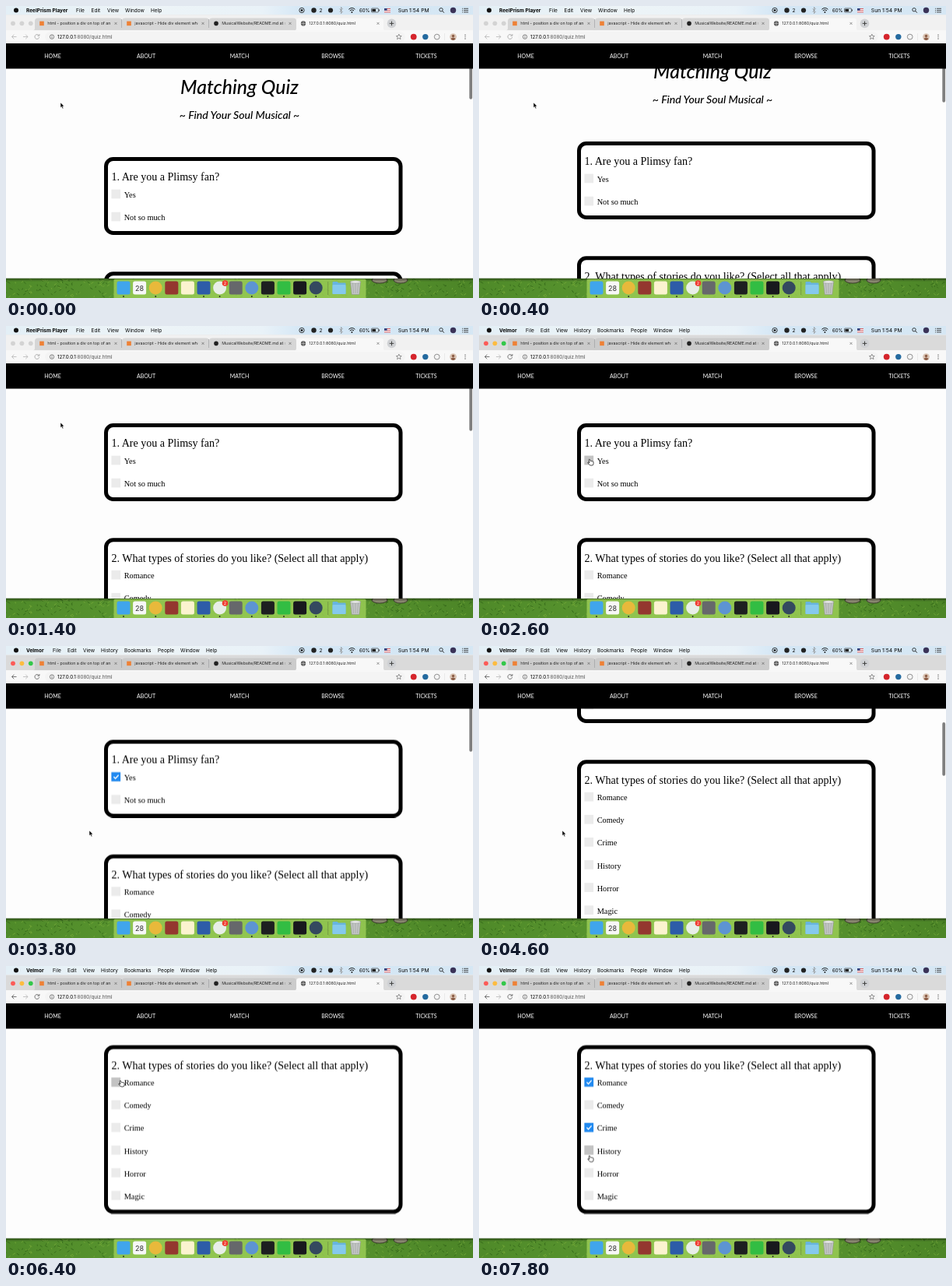
Recreate the animation shown at these times as an HTML page. Size 600 px wide and 375 px high, loop 8 s.

```html
<!DOCTYPE html>
<html lang="en">
<head>
<meta charset="utf-8">
<title>Matching Quiz</title>
<style>
  html, body { margin: 0; width: 100%; height: 100%; overflow: hidden; background: #fff; }
  svg { display: block; }
  #stage { width: 600px; height: 375px; }
  .ui { font-family: Inter, Roboto, sans-serif; }
  .menu { font-size: 6.5px; }
  .url { font-size: 6.25px; }
  .tab { font-size: 5.3px; }
  .nav { font: 7px Lato, sans-serif; fill: #fff; text-anchor: middle; }
  .title { font: italic 500 24.8px Lato, cursive; text-anchor: middle; }
  .subtitle { font: italic 500 14.1px Lato, cursive; text-anchor: middle; }
  .question { font: 14.06px "Liberation Serif", serif; }
  .option { font: 10.31px "Liberation Serif", serif; }
  .timed, .scroll, .thumb, .pointer { animation: 8s step-end infinite; }
  .scroll { animation-name: scroll; }
  .thumb { animation-name: thumb; }
  .pointer { animation-name: pointer; }

  @keyframes scroll {
    0% { transform: translateY(0); }
    2.5% { transform: translateY(-4px); }
    5% { transform: translateY(-20px); }
    7.5% { transform: translateY(-38px); }
    10% { transform: translateY(-52px); }
    12.5% { transform: translateY(-61px); }
    15% { transform: translateY(-66px); }
    17.5% { transform: translateY(-69px); }
    47.5% { transform: translateY(-73.5px); animation-timing-function: steps(4); }
    57.5% { transform: translateY(-195px); }
    60% { transform: translateY(-215px); }
    62.5% { transform: translateY(-229px); }
    65% { transform: translateY(-237px); }
    67.5%, 100% { transform: translateY(-239.5px); }
  }
  @keyframes thumb {
    0% { transform: translateY(0); }
    5% { transform: translateY(4px); animation-timing-function: steps(5); }
    17.5% { transform: translateY(15px); }
    47.5% { transform: translateY(16px); animation-timing-function: steps(4); }
    57.5% { transform: translateY(47px); animation-timing-function: steps(4); }
    67.5%, 100% { transform: translateY(57px); }
  }
  @keyframes pointer {
    0% { transform: translate(70px, 124px); }
    22.5% { transform: translate(70px, 124px); animation-timing-function: steps(3); }
    30% { transform: translate(142px, 171px); }
    37.5% { transform: translate(142px, 171px); animation-timing-function: steps(2); }
    42.5% { transform: translate(107px, 237px); }
    67.5% { transform: translate(107px, 237px); animation-timing-function: steps(4); }
    77.5% { transform: translate(147px, 147px); }
    85% { transform: translate(147px, 147px); animation-timing-function: steps(2); }
    90% { transform: translate(142px, 207px); }
    97.5%, 100% { transform: translate(142px, 243.5px); }
  }
</style>
</head>
<body>
<svg id="stage" viewBox="0 0 600 375" xmlns="http://www.w3.org/2000/svg"></svg>
<script>
const LOOP = 8000, ACTIVATE = 2600;
const rules = new Set();

// Wraps markup so that it shows only from start to end (ms).
function during(start, end, markup) {
  const name = `show-${start}-${end}`;
  rules.add(`@keyframes ${name} { 0% { opacity: 0 } ${start / LOOP * 100}% { opacity: 1 } ${end / LOOP * 100}% { opacity: 0 } }`);
  return `<g class="timed" style="animation-name:${name}">${markup}</g>`;
}
const rect = (x, y, w, h, fill, r = 0) => `<rect x="${x}" y="${y}" width="${w}" height="${h}" rx="${r}" fill="${fill}"/>`;
const circle = (x, y, r, fill) => `<circle cx="${x}" cy="${y}" r="${r}" fill="${fill}"/>`;
const line = (d, color, width = .8) => `<path d="${d}" fill="none" stroke="${color}" stroke-width="${width}"/>`;
const text = (x, y, str, cls, extra = '') => `<text x="${x}" y="${y}" class="${cls}" ${extra}>${str}</text>`;

function wallpaper() {
  let seed = 7, blades = '';
  const random = () => (seed = seed * 16807 % 2147483647) / 2147483647;
  for (let i = 0; i < 420; i++) {
    const x = random() * 600, y = 351 + random() * 24;
    blades += line(`M${x.toFixed(1)} ${y.toFixed(1)}l${(random() * 8 - 4).toFixed(1)} -2`, random() < .55 ? '#35691a' : '#72a638', .9);
  }
  const rock = (x, rx) => `<ellipse cx="${x}" cy="352" rx="${rx}" ry="4" fill="#8c8a72" stroke="#3a3a2c" stroke-width="1"/>`;
  return rect(0, 349, 600, 26, 'url(#grass)') + blades + rock(480, 10) + rock(507, 9) + rect(0, 349, 600, 5, 'url(#shade)');
}

function questionBox(top, question, options) {
  const frame = `<rect x="128.5" y="${top + 2.5}" width="378.5" height="${36.8 + options.length * 29.1}" rx="9.3" fill="#fff" stroke="#000" stroke-width="5"/>`;
  const rows = options.map(({ label, hover = [], checked }, i) => {
    const y = top + 41.6 + i * 29.1;
    const tick = `M138.4 ${y + 5.9}l2.2 2.3 4-4.6`;
    return rect(135.4, y, 11.7, 11.7, '#ebebeb')
      + (hover.length ? during(...hover, rect(135.4, y, 11.7, 11.7, '#c3c3c3')) : '')
      + (checked ? during(checked, LOOP, rect(135.4, y, 11.7, 11.7, '#2089f0') + line(tick, '#fff', 1.4)) : '')
      + text(151.7, y + 10.4, label, 'option');
  });
  return frame + text(135.4, top + 30.4, question, 'question') + rows.join('');
}

function page() {
  const content = text(300, 112.5, 'Matching Quiz', 'title')
    + text(300, 144.5, '~ Find Your Soul Musical ~', 'subtitle')
    + questionBox(194, '1. Are you a Plimsy fan?', [
      { label: 'Yes', hover: [2400, 3200], checked: 2800 },
      { label: 'Not so much' }
    ])
    + questionBox(341.2, '2. What types of stories do you like? (Select all that apply)', [
      { label: 'Romance', hover: [6200, 7000], checked: 6600 },
      { label: 'Comedy', hover: [7000, 7200] },
      { label: 'Crime', hover: [7200, 7800], checked: 7400 },
      { label: 'History', hover: [7800, 8000] },
      { label: 'Horror' },
      { label: 'Magic' }
    ]);
  const thumb = `<g class="thumb">${rect(595.3, 51, 3.8, 68.7, 'rgba(0,0,0,.5)', 1.9)}</g>`;
  const links = ['HOME', 'ABOUT', 'MATCH', 'BROWSE', 'TICKETS'];
  return rect(0, 48, 600, 301.7, '#fdfdfd')
    + `<g clip-path="url(#viewport)"><g class="scroll">${content}</g></g>`
    + rect(0, 48, 600, 32.5, '#000')
    + links.map((label, i) => text(60 + i * 120, 67, label, 'nav')).join('')
    + during(0, 2200, thumb) + during(3800, 6000, thumb);
}

function menuBar() {
  const items = list => list.map(([x, label], i) => text(x, 7.9, label, 'ui menu', i ? '' : 'font-weight="700"')).join('');
  const player = [[26, 'ReelPrism Player'], [90, 'File'], [109.5, 'Edit'], [130, 'View'], [153, 'Window'], [186, 'Help']];
  const browser = [[26, 'Velmor'], [60, 'File'], [79, 'Edit'], [99, 'View'], [122, 'History'], [152, 'Bookmarks'],
    [195, 'People'], [224, 'Window'], [257, 'Help']];
  return rect(0, 0, 600, 11.5, 'url(#sky)') + circle(13, 5.4, 3, '#111')
    + during(0, ACTIVATE, items(player)) + during(ACTIVATE, LOOP, items(browser))
    + `<circle cx="380" cy="5.5" r="3.2" fill="none" stroke="#111" stroke-width=".8"/>` + rect(378.7, 4.2, 2.6, 2.6, '#111', .5)
    + circle(395.5, 5.5, 3.2, '#222') + text(402.5, 7.9, '2', 'ui menu')
    + circle(417, 5.5, 3.1, '#222')
    + line('M428.5 3.5l4 4-2 2v-8l2 2-4 4', '#888', .7)
    + line('M440.4 4.3q4-3.6 8 0M441.8 6q2.6-2.4 5.2 0', '#111', 1) + circle(444.4, 8, .9, '#111')
    + text(454, 7.9, '60%', 'ui menu', 'style="font-size:6px"')
    + `<rect x="469.5" y="3" width="9" height="5" rx="1" fill="none" stroke="#222" stroke-width=".6"/>`
    + rect(470.4, 3.9, 4.6, 3.2, '#222') + rect(479, 4.5, .8, 2, '#222')
    + rect(486, 3, 8, 5.4, '#fff') + line('M486 3.5h8M486 5.7h8M486 7.9h8', '#c8343c', .8) + rect(486, 3, 3.6, 2.8, '#35457f')
    + text(503.8, 7.9, 'Sun 1:54 PM', 'ui menu', 'style="font-size:6.8px"')
    + `<circle cx="559" cy="4.8" r="2.2" fill="none" stroke="#111" stroke-width=".8"/>` + line('M560.6 6.4l2.2 2.2', '#111', 1)
    + circle(574.5, 5.5, 3.7, '#3b3358')
    + line('M586 3.3h1M588 3.3h6M586 5.6h1M588 5.6h6M586 7.9h1M588 7.9h6', '#222', .8);
}

function browserBar() {
  const tabs = [
    [46, 'html - position a div on top of another', '#ee8136'],
    [158, 'javascript - Hide div element when', '#ee8136'],
    [270, 'MusicalWebsite/README.md at master', '#222'],
    [382, '127.0.0.1:8080/quiz.html', '#555']
  ];
  const lights = colors => colors.map((c, i) => circle(9 + i * 11.4, 22.3, 2.9, c)).join('');
  const cross = x => line(`M${x - 1.5} 20.9l3 3m0-3l-3 3`, '#555', .6);
  const tabShape = (x, fill) => `<path d="M${x} 31.5q3 0 3-3v-9q0-4 4-4h104q4 0 4 4v9q0 3 3 3z" fill="${fill}"/>`;
  const strip = (back, tab) => rect(0, 11.5, 600, 20, back) + [34, 146, 258].map(x => tabShape(x, tab)).join('');
  const tabMarkup = tabs.map(([x, label, color], i) => (i < 2 ? rect(x + 102, 17, .5, 11, '#8d8f92') : '')
    + (i === 3 ? circle(x, 22.4, 3.1, color) + line(`M${x - 3} 22.4h6M${x} 19.4v6`, '#eee', .5)
      : rect(x - 2.8, 19.6, 5.6, 5.6, color, i === 2 ? 2.8 : 0))
    + `<svg x="${x + 7.3}" y="14" width="81" height="16">${text(0, 10.4, label, 'ui tab', 'fill="#222"')}</svg>`
    + cross(x + (i === 3 ? 96 : 95))).join('');
  const arrows = (back, rest) => line('M13.5 39.5h-6m2.8-2.8l-2.8 2.8 2.8 2.8', back)
    + line('M22 39.5h6m-2.8-2.8l2.8 2.8-2.8 2.8', '#b5b5b5')
    + line('M42.2 37.8a2.9 2.9 0 1 0 .5 2.3M42.9 36v2.3h-2.4', rest);
  return strip('#dadada', '#cbcbcb') + during(0, ACTIVATE, strip('#f1f1f1', '#d6d6d6'))
    + tabShape(370, '#f8f8f8')
    + tabMarkup
    + circle(495.5, 22.4, 5.8, '#cfd1d4') + line('M492.7 22.4h5.6M495.5 19.6v5.6', '#333', .9)
    + rect(0, 31.2, 600, 16.8, '#f8f8f8') + rect(50, 33.2, 463, 13, '#f4f4f4', 6.5)
    + during(0, ACTIVATE, lights(['#d3d3d3', '#d3d3d3', '#d3d3d3']) + arrows('#b5b5b5', '#a0a0a0'))
    + during(ACTIVATE, LOOP, lights(['#fc5b57', '#fdbc40', '#34c84a']) + arrows('#555', '#555'))
    + `<circle cx="59" cy="39.6" r="2.7" fill="none" stroke="#555" stroke-width=".7"/>` + line('M59 39.2v1.9M59 37.8v.7', '#555', .7)
    + text(66, 42, '127.0.0.1<tspan fill="#555">:8080/quiz.html</tspan>', 'ui url')
    + '<path d="M504.8 36.2l1 2.2 2.4.2-1.8 1.6.6 2.4-2.2-1.3-2.2 1.3.6-2.4-1.8-1.6 2.4-.2z" fill="none" stroke="#555" stroke-width=".6"/>'
    + circle(523.7, 39.6, 3.9, '#d5252c') + circle(538.8, 39.6, 3.7, '#246a9f')
    + '<circle cx="553.7" cy="39.6" r="3.4" fill="#f4f4f4" stroke="#777" stroke-width=".8"/>'
    + rect(563.5, 35, .5, 9, '#ddd')
    + circle(574.5, 39.6, 4.4, '#d9c4b4') + circle(574.5, 38.5, 1.7, '#8b5c45') + '<path d="M571.3 42.6q3.2-4 6.4 0-3.2 2.6-6.4 0z" fill="#8b5c45"/>'
    + [37.2, 39.6, 42].map(y => circle(590, y, .7, '#555')).join('');
}

function dock() {
  const icons = [
    ['#40a5ec', 0, 1], ['#f7f7f7', 0, 0], ['#e8b93b', 1, 1], ['#94372f', 0, 0], ['#fbf3cf', 0, 0], ['#2d5ca8', 0, 1],
    ['#e8eee8', 1, 1], ['#66686b', 0, 0], ['#5d94d2', 1, 1], ['#1d1f20', 0, 1], ['#32bd43', 0, 1], ['#18181d', 0, 1], ['#34495f', 1, 1]
  ];
  const apps = icons.map(([color, round, running], i) => {
    const x = 151 + i * 20.6;
    return rect((x - 8.5).toFixed(1), 353.5, 17, 17, color, round ? 8.5 : 2.5) + (running ? circle(x.toFixed(1), 373, .9, '#222') : '');
  }).join('');
  const folder = '<path d="M419.5 355q0-1 1-1h5l1.5 1.5h8.5q1 0 1 1v12.5q0 1-1 1h-15q-1 0-1-1z" fill="#68b5e0"/>' + rect(419.5, 358, 17, 12, '#85c9ec', 1);
  const bin = '<path d="M442.5 354h13l-1.7 16.5h-9.6z" fill="#c3c6c5" stroke="#8f9492" stroke-width=".6"/>'
    + line('M445.5 356l1 13M449 356v13M452.5 356l-1 13', '#979c9a', .6) + '<ellipse cx="449" cy="354.4" rx="6.6" ry="1.6" fill="#ececec" stroke="#8f9492" stroke-width=".5"/>';
  return rect(138.5, 350.8, 324, 25, 'rgba(158,208,88,.8)', 1.5) + apps
    + text(171.6, 366, '28', 'ui', 'font-size="9" text-anchor="middle" fill="#333"')
    + circle(281.5, 356, 3.8, '#f0392f') + text(281.5, 358, '2', 'ui', 'font-size="5.4" text-anchor="middle" fill="#fff"')
    + rect(413.5, 354, .6, 17, '#64803f') + folder + bin;
}

function pointer() {
  const arrow = '<path d="M0 0v6.6l1.5-1.4 1.1 2.5 1.2-.5-1.1-2.4h2.1z" fill="#000" stroke="#fff" stroke-width=".5"/>';
  const hand = '<path d="M-.9 .6q.9-1.2 1.5 0l.8 2q.7-.6 1.2 0 .7-.5 1.2.2 1-.3 1.1.8l.2 2q-.3 1.6-1.2 2.4h-3.2q-1.4-1.4-2.8-3.2-.4-1.2.8-.8l1.2.8z" fill="#fff" stroke="#000" stroke-width=".7"/>';
  return `<g class="pointer">${during(0, 2400, arrow)}${during(2400, 3200, hand)}${during(3200, 6200, arrow)}${during(6200, LOOP, hand)}</g>`;
}

const defs = `<defs>
  <linearGradient id="sky"><stop stop-color="#e3eff6"/><stop offset=".3" stop-color="#edf4f7"/><stop offset=".55" stop-color="#e9f2f8"/><stop offset=".64" stop-color="#d3e6f5"/><stop offset="1" stop-color="#d6e7f4"/></linearGradient>
  <linearGradient id="grass"><stop stop-color="#4f8a29"/><stop offset=".5" stop-color="#5f9c33"/><stop offset="1" stop-color="#4c8527"/></linearGradient>
  <linearGradient id="shade" x2="0" y2="1"><stop stop-color="#000" stop-opacity=".5"/><stop offset="1" stop-color="#000" stop-opacity="0"/></linearGradient>
  <clipPath id="viewport"><rect y="48" width="600" height="301.7"/></clipPath>
</defs>`;

const markup = defs + wallpaper() + page() + menuBar() + browserBar() + dock() + pointer();
const style = document.createElement('style');
style.textContent = [...rules].join('\n');
document.head.append(style);
document.getElementById('stage').innerHTML = markup;
</script>
</body>
</html>
```
